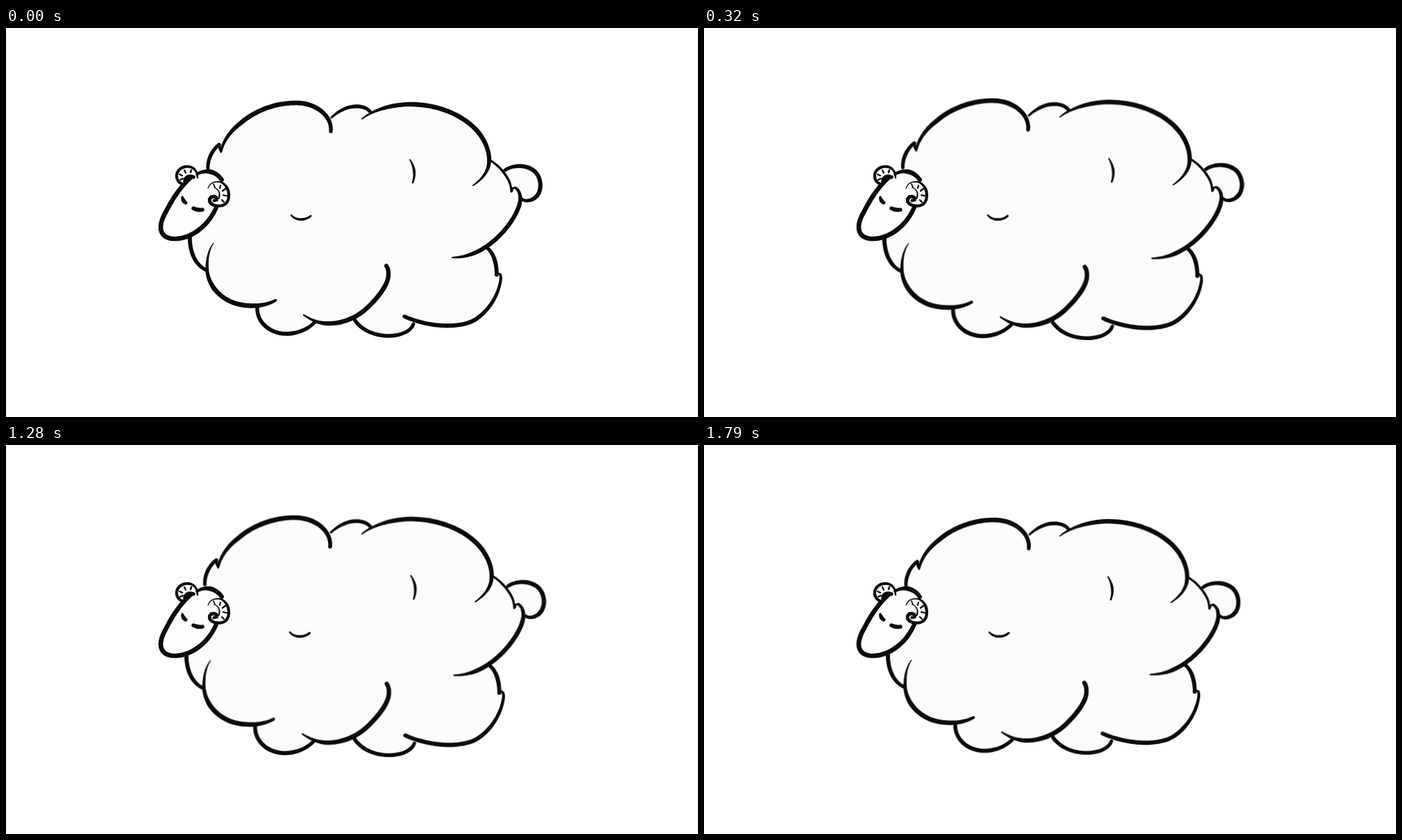
Animation, 997 px wide and 561 px high, one loop 1920 ms. Source, as an HTML page:

```html
<!DOCTYPE html>
<html lang="en">
<head>
<meta charset="utf-8">
<title>Breathing ram</title>
<style>
  html, body { margin: 0; width: 100%; height: 100%; overflow: hidden; background: #fff; }
  svg { display: block; width: 997px; height: 561px; }
  #body { transform-origin: 518px 275px; }
</style>
</head>
<body>
<svg viewBox="0 0 997 561">
  <g id="body"></g>
  <g id="head"></g>
</svg>
<script>
const INK = '#0b0b0c', WOOL = '#fcfcfc', SKIN = '#fefefe';
const WEIGHT = 1.22; // overall line weight
const body = document.getElementById('body');
const head = document.getElementById('head');

function addPath(parent, d, fill) {
  const p = document.createElementNS('http://www.w3.org/2000/svg', 'path');
  p.setAttribute('d', d);
  p.setAttribute('fill', fill);
  parent.append(p);
  return p;
}

// Brush line whose width runs through the given values, with round ends.
function brush(parent, d, ...widths) {
  const path = addPath(parent, d, INK);
  const length = path.getTotalLength();
  const n = Math.max(8, Math.round(length / 4));
  const left = [], right = [];
  const radius = u => {
    const x = u * (widths.length - 1);
    const i = Math.min(Math.floor(x), widths.length - 2);
    return WEIGHT * (widths[i] + (widths[i + 1] - widths[i]) * (x - i)) / 2;
  };
  for (let i = 0; i <= n; i++) {
    const s = length * i / n;
    const p = path.getPointAtLength(s);
    const a = path.getPointAtLength(Math.max(0, s - 0.5));
    const b = path.getPointAtLength(Math.min(length, s + 0.5));
    const angle = Math.atan2(b.y - a.y, b.x - a.x);
    const dx = -Math.sin(angle) * radius(i / n), dy = Math.cos(angle) * radius(i / n);
    left.push(`${(p.x + dx).toFixed(2)} ${(p.y + dy).toFixed(2)}`);
    right.unshift(`${(p.x - dx).toFixed(2)} ${(p.y - dy).toFixed(2)}`);
  }
  const r0 = radius(0), r1 = radius(1);
  path.setAttribute('d',
    `M${left.join('L')}A${r1} ${r1} 0 0 0 ${right.join('L')}A${r0} ${r0} 0 0 0 ${left[0]}Z`);
}

// Wool and tail
addPath(body, `M291 203 C290 190 297 176 307 168 C314 158 324 148 336 139
  C358 119 388 108 418 108 C442 108 463 121 468 130 C480 119 492 113 505 113
  C514 113 521 116 525 121 C545 112 565 110 582 110 C625 110 665 128 684 155
  C692 167 696 180 696 190 C709 198 718 208 724 219 L730 230 C738 229 741 239 741 248
  C739 266 722 290 705 305 L693 317 C702 324 707 338 707 356 C714 353 713 361 713 361
  C711 380 700 404 677 420 C655 434 615 432 587 427 C584 437 569 444 551 444
  C530 444 512 435 503 422 C486 428 465 428 445 424 C436 434 420 441 404 441
  C380 441 361 424 362 402 C350 401 339 400 327 396 C307 388 293 372 289 350
  C270 340 265 318 265 300 Z`, WOOL);
const tail = 'M719 205 C729 198 746 197 756 203 C768 208 772 224 769 234 C766 246 755 250 748 249 C743 248 740 244 740 241';
addPath(body, tail + 'L730 230 Z', WOOL);

[
  ['M291 203 C290 190 297 176 307 168', 4, 4.5, 4],
  ['M308 168 C307 172 308 175 310 179', 3, 3, 2],
  ['M310 177 C313 163 324 148 336 139 C358 119 388 108 418 108 C446 108 470 126 468 149', 3, 5.5, 5.5, 5.5, 4.5],
  ['M469 129 C480 119 492 113 505 113 C514 113 521 116 525 121', 2.5, 4, 4.5, 4],
  ['M513 131 C530 117 560 110 582 110 C625 110 665 128 684 155 C695 171 699 189 694 203 C690 213 682 221 673 227', 1.5, 5, 5.5, 5.5, 5.5, 5, 1.5],
  ['M698 191 C709 198 718 208 724 219 C727 225 728 231 728 236', 2.5, 3, 2.5],
  [tail, 4, 5, 5, 5, 3],
  ['M729 235 C729 230 732 228 736 232 C740 236 741 241 741 248 C739 266 722 290 705 305 C688 320 668 331 643 331', 2.5, 5, 5.2, 5.2, 5, 1.8],
  ['M693 317 C702 324 707 338 707 356', 4, 5, 4.5],
  ['M706 356 C709 352 713 352 713 361 C711 380 700 404 677 420 C655 434 610 432 574 416', 3, 4, 4.8, 5, 5, 4.5],
  ['M503 422 C512 435 530 444 551 444 C569 444 584 437 587 427', 4.5, 4.5, 4.5, 4],
  ['M429 414 C444 424 456 427 470 426 C486 425 505 418 520 404 C538 387 552 368 551 354 C551 349 550 346 548 343', 1.8, 5, 5.5, 5.5, 5.5, 5],
  ['M362 403 C361 424 380 441 404 441 C420 441 436 434 445 424', 4.5, 4.8, 4.8, 4],
  ['M299 310 C290 322 289 340 290 352 C293 372 307 388 327 396 C347 403 372 402 388 393', 1, 3.5, 5.5, 5.5, 5.5, 3.5],
  ['M265 299 C264 318 270 340 288 349', 4.8, 4.8, 4],
  ['M411 270 C417 278 432 278 439 271', 2, 3.2, 2.5],
  ['M582 190 C589 201 590 212 586 223', 1.5, 3.4, 2]
].forEach(line => brush(body, ...line));

// Face
const cheek = `M266 216 C252 228 240 246 231 264 C222 279 219 294 230 301
  C241 307 256 303 265 299 C284 290 297 274 304 256`;
addPath(head, cheek + 'C316 235 316 222 307 214 C297 206 282 206 275 212 Z', SKIN);
brush(head, cheek, 5, 5.5, 5.5, 5.5, 5.5, 5.5, 5);
brush(head, 'M275 211 C285 204 302 205 311 219', 3, 5.5, 5);
brush(head, 'M254 244 C255 249 257 251 259 252', 3, 5, 4);
brush(head, 'M270 260 C274 262 279 263 283 262', 4.5, 5, 4.5);

// Horns
addPath(head, 'M253 226 C245 222 243 210 250 204 C258 197 270 199 275 208 L271 214 C262 211 256 216 257 222 Z', SKIN);
addPath(head, 'M291 231 C294 219 310 219 317 228 C325 238 322 252 312 256 C303 259 294 255 293 249 L304 244 C308 236 300 230 291 231 Z', SKIN);
[
  ['M254 225 C245 222 243 210 250 204 C258 197 270 199 274 207 C276 210 275 213 276 216', 3.5, 3.5, 3.5, 3, 2],
  ['M257 222 C257 216 263 212 270 215', 3, 4.5, 4.5],
  ['M250 211 L254 213', 1.8, 1.8],
  ['M257 205 L259 209', 1.8, 1.8],
  ['M267 205 L266 208', 2.2, 2.2],
  ['M251 219 L255 217', 1.8, 1.8],
  ['M291 231 C294 222 302 221 309 222 C314 224 318 228 320 234 C323 246 319 254 312 256 C303 258 294 255 293 249 C293 243 299 241 304 245 C305 248 303 250 300 249', 1, 1.5, 3.5, 3.5, 3.5, 4.5, 4],
  ['M300 230 C306 232 310 239 306 246', 1, 1.5, 2],
  ['M299 225 L301 230', 1.5, 1.5],
  ['M309 227 L308 231', 1.8, 1.8],
  ['M316 232 L312 235', 2.2, 1.8],
  ['M318 242 L313 241', 1.8, 1.8],
  ['M314 251 L311 248', 1.8, 1.8]
].forEach(line => brush(head, ...line));

// Breathing: held poses [start ms, scale]
const LOOP = 1920;
const poses = [[0, 1], [160, 1.0105], [320, 1.02], [480, 1.0245],
               [1280, 1.02], [1440, 1.0105], [1600, 1], [LOOP, 1]];
body.animate(
  poses.map(([t, s]) => ({ offset: t / LOOP, transform: `scale(${s})`, easing: 'steps(1, end)' })),
  { duration: LOOP, iterations: Infinity }
);
</script>
</body>
</html>
```
